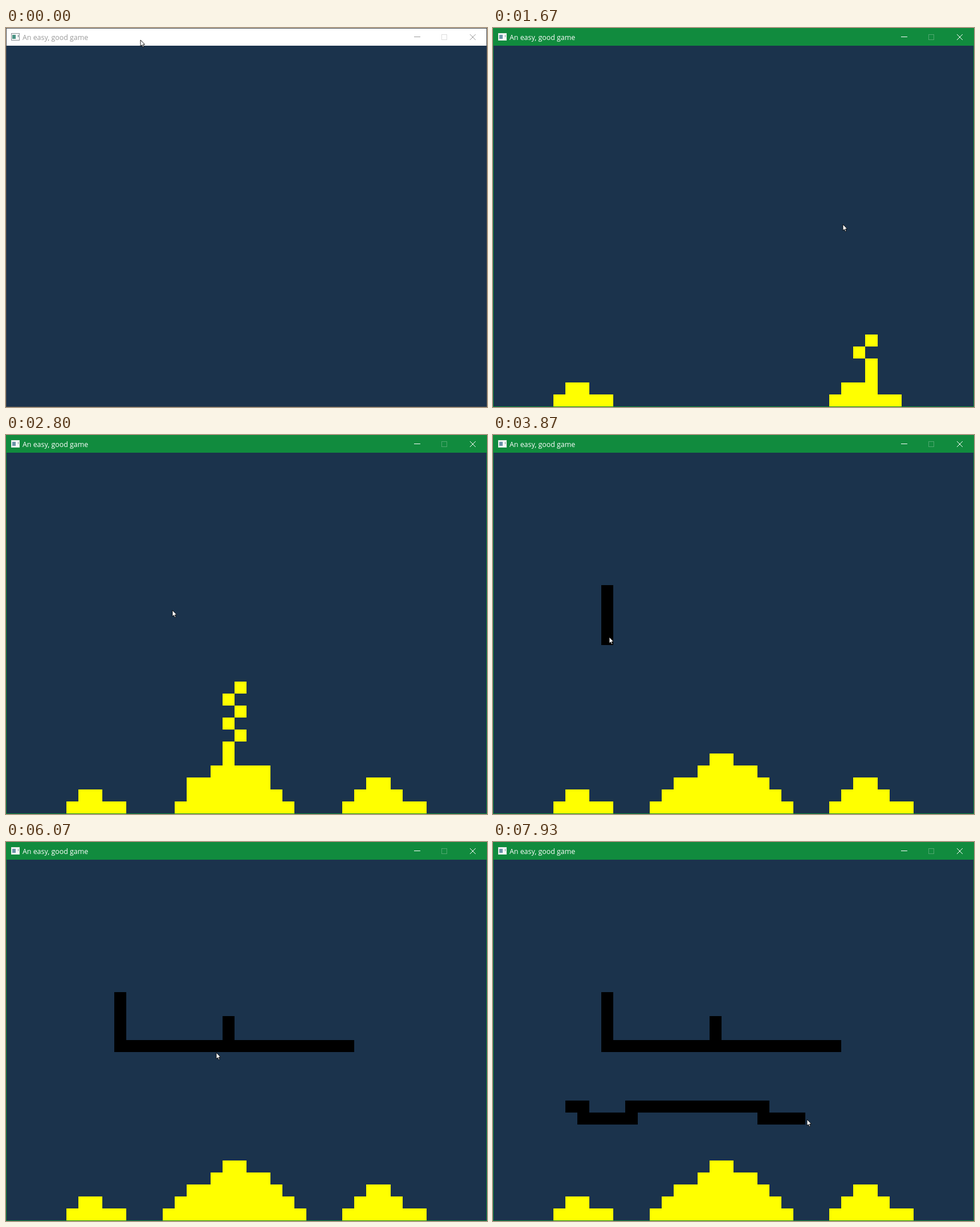
These frames come from a looping animation (844x664 px, 8000 ms). An HTML page with a canvas:

```html
<!DOCTYPE html>
<html lang="en">
<head>
<meta charset="utf-8">
<title>Falling sand</title>
<style>
html, body { margin: 0; width: 100%; height: 100%; overflow: hidden; background: #1b334c; }
canvas { position: absolute; left: 0; top: 0; }
#title {
  position: absolute; left: 29px; top: 7px; line-height: 19px; white-space: nowrap;
  font-family: "Open Sans", "Noto Sans", sans-serif; font-size: 12.4px;
}
</style>
</head>
<body>
<canvas id="stage" width="844" height="664"></canvas>
<div id="title">An easy, good game</div>
<script>
const ctx = document.getElementById('stage').getContext('2d');
const title = document.getElementById('title');
const LOOP = 8000, STEP = 1000 / 15, CELL = 21.05, FLOOR = 29, LAG = 25;
const SWEEP = 7067, SWEEP_TIME = 866;

// Pointer key points: time, x, y
const path = [
  [133, 236, 21], [760, 155, 400], [920, 155, 400], [1200, 680, 377],
  [1330, 662, 348], [1560, 662, 348], [2110, 413, 329], [2660, 411, 323],
  [2900, 207, 296], [3050, 204, 272], [3867, 204, 354], [4733, 471, 362],
  [5067, 599, 358], [5333, 398, 340], [5600, 397, 340], [5867, 395, 312],
  [6000, 395, 312], [6350, 260, 612], [6800, 141, 474]
];

// Times during which the pointer draws walls
const strokes = [[3060, 5115], [5620, 5890], [7040, LOOP]];

// Sand piles: first tick, first row, spout columns, [left, right] per layer from the floor up
const piles = [
  { tick: 48, row: 18, spout: [7, 6], layers: [[5, 9], [6, 7]] },
  { tick: 80, row: 16, spout: [31, 30], layers: [[28, 34], [29, 32], [30, 31]] },
  { tick: 128, row: 15, spout: [19, 18], layers: [[13, 24], [14, 23], [15, 22], [17, 21], [18, 19]] }
];

// Grains settle near the spout first, then outwards and upwards
for (const p of piles) {
  const mid = (p.spout[0] + p.spout[1]) / 2;
  p.grains = [];
  p.layers.forEach(([a, b], h) => {
    for (let col = a; col <= b; col++)
      p.grains.push({ col, row: FLOOR - h, key: Math.abs(col - mid) + 1.3 * h });
  });
  p.grains.sort((a, b) => a.key - b.key);
}

const clamp = (v, lo, hi) => Math.max(lo, Math.min(hi, v));

// Last stroke: a steady sweep to the right along a cubic wave
function sweep(t) {
  const u = Math.min(1, (t - SWEEP) / SWEEP_TIME);
  return [141 + 410 * u, 474.14 + 88 * (u - 0.04) * (u - 0.245) * (u - 0.815)];
}

function pointer(t) {
  if (t >= SWEEP) return sweep(t);
  let i = 1;
  while (i < path.length - 1 && path[i][0] < t) i++;
  const [t0, x0, y0] = path[i - 1], [t1, x1, y1] = path[i];
  const k = clamp((t - t0) / (t1 - t0), 0, 1);
  return [x0 + (x1 - x0) * k, y0 + (y1 - y0) * k];
}

function rect(color, x, y, w, h) {
  ctx.fillStyle = color;
  ctx.fillRect(x, y, w, h);
}

function cell(color, col, row) {
  const x = c => Math.round(0.9 + c * CELL), y = r => Math.round(31.6 + r * CELL);
  rect(color, x(col), y(row), x(col + 1) - x(col), y(row + 1) - y(row));
}

function drawWindow(active) {
  const bar = active ? '#118b3e' : '#ffffff';
  const ink = active ? '#ffffff' : '#999999';
  const faint = active ? '#4fa86f' : '#dddddd';
  rect(active ? '#118b3e' : '#444a50', 0, 0, 844, 664);
  rect(bar, 1, 1, 842, 30);
  rect('#1b334c', 1, 31, 842, 632);
  title.style.color = ink;

  rect(active ? '#dfe9e4' : '#8b9094', 9, 9, 15, 13);
  rect('#f8f8f8', 10, 10, 13, 11);
  rect(active ? '#6a94a8' : '#4b9384', 11, 12, 6, 7);
  rect(active ? '#7c9aa0' : '#55777a', 21, 12, 1, 4);

  rect(ink, 716, 15, 11, 1);
  ctx.lineWidth = 1;
  ctx.strokeStyle = faint;
  ctx.strokeRect(764.5, 11.5, 9, 9);
  ctx.strokeStyle = ink;
  ctx.beginPath();
  ctx.moveTo(814, 11); ctx.lineTo(824, 21);
  ctx.moveTo(824, 11); ctx.lineTo(814, 21);
  ctx.stroke();
}

function drawSand(t) {
  const tick = Math.round(t * 0.06);
  for (const p of piles) {
    p.grains.forEach((g, i) => {
      const age = tick - p.tick - i;
      if (age < 0) return;
      const row = Math.min(g.row, p.row + age), reach = g.row - row;
      cell('#ffff00', clamp(p.spout[i % 2], g.col - reach, g.col + reach), row);
    });
  }
}

function drawWalls(t) {
  for (const [from, to] of strokes) {
    for (let s = from; s <= Math.min(t, to); s += 8) {
      const [x, y] = pointer(s - LAG);
      cell('#000000', Math.floor((x - 1) / CELL), Math.floor((y - 32) / CELL));
    }
  }
}

function drawPointer(t) {
  const [x, y] = pointer(t).map(Math.round);
  const shape = [[0, 0], [0, 11], [2.5, 8.7], [4.1, 12.6], [5.9, 11.9], [4.3, 8.1], [7.6, 8]];
  ctx.beginPath();
  for (const [dx, dy] of shape) ctx.lineTo(x + dx, y + dy);
  ctx.closePath();
  ctx.fillStyle = '#ffffff';
  ctx.fill();
  ctx.lineWidth = 0.9;
  ctx.strokeStyle = '#000000';
  ctx.stroke();
}

function draw(now) {
  const t = Math.floor((now % LOOP + 5) / STEP) * STEP;
  drawWindow(t > 130);
  drawSand(t);
  drawWalls(t);
  drawPointer(t);
}

let start;
function loop(now) {
  if (start === undefined) start = now;
  draw(now - start);
  requestAnimationFrame(loop);
}
draw(0);
requestAnimationFrame(loop);
</script>
</body>
</html>
```
